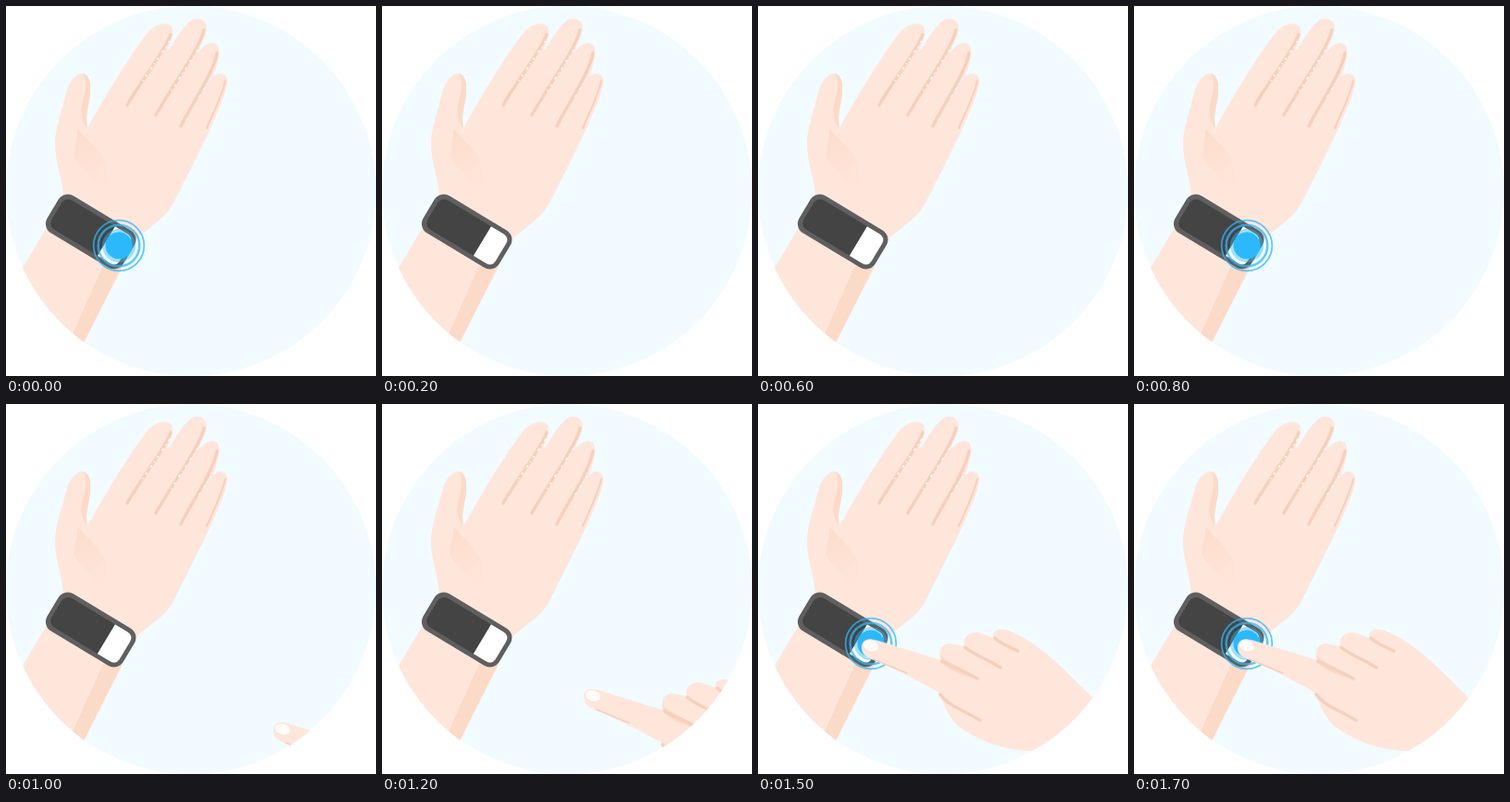
An HTML page for the animation above (1800 ms loop, 400 by 400 pixels).

```html
<!DOCTYPE html>
<html lang="en">
<head>
<meta charset="utf-8">
<title>Tap the wristband</title>
<style>
  html, body { margin: 0; width: 100%; height: 100%; overflow: hidden; background: #fff; }
  svg { display: block; width: 100%; height: 100%; }
  .skin { fill: #ffe6db; }
  .shade { fill: #fbdac8; }
  .crease { fill: none; stroke: #f5d0bc; stroke-width: 3.5; stroke-linecap: round; }
  .glint { fill: none; stroke: #fff; stroke-width: 1.5; stroke-dasharray: 2 5 1 4 3 7; }
  .ring { fill: none; stroke: #2bb9fc; stroke-opacity: .75; }
</style>
</head>
<body>
<svg viewBox="0 0 400 400">
  <defs>
    <clipPath id="disc"><circle cx="200" cy="200" r="200"/></clipPath>
    <linearGradient id="palm" x1="0" y1="0" x2=".3" y2="1">
      <stop offset="0" stop-color="#fbdac8" stop-opacity=".8"/>
      <stop offset="1" stop-color="#fbdac8" stop-opacity=".1"/>
    </linearGradient>
  </defs>
  <g clip-path="url(#disc)">
    <rect width="400" height="400" fill="#f2fbff"/>

    <!-- forearm -->
    <path class="skin" d="M46 236L10 296L60 380H76L126 282Z"/>
    <path class="shade" d="M105 281L70 359L84 364L125 282Z"/>

    <!-- open hand -->
    <path class="skin" d="M62 206C61 185 53 170 53 148C53 132 60 115 65 94C69 80 76 73 83 73
      C90 74 92 83 91 95C90 108 85 116 88 132C103 105 133 54 153 29C162 18 176 16 180 24
      C181 33 177 41 174 48L177 46C185 33 193 20 201 15C209 11 217 16 217 24C216 34 209 44 207 51
      C213 43 220 38 227 41C234 46 229 61 224 77C230 70 239 73 239.5 81C238 94 230 112 222 130
      C210 156 194 187 180 215C172 230 155 238 141 252L90 240Z"/>
    <path class="shade" d="M83 73C90 74 92 83 91 95C90 108 85 116 88 132C82 125 80 116 82 106C86 94 88 82 83 73Z"/>
    <path fill="url(#palm)" d="M78 133C88 146 107 158 109 178C110 190 108 198 106 204C98 187 82 178 73 163Z"/>
    <g class="crease">
      <path d="M178 31C172 48 148 78 131 107"/>
      <path d="M214 26C210 45 180 86 162 118"/>
      <path d="M228 51C224 73 202 104 189 130"/>
      <path d="M237 81C235 93 226 112 217 132" stroke-width="2"/>
    </g>
    <path class="glint" d="M177 38L147 82M207 48L177 94M222 78L209 98"/>

    <!-- wristband -->
    <g transform="translate(91.7 244) rotate(31)">
      <rect x="-48" y="-23.5" width="96" height="47" rx="12" fill="#5f5f5f"/>
      <rect x="-43" y="-18.5" width="86" height="37" rx="8" fill="#444"/>
      <path d="M19.5 -18.5H35Q43 -18.5 43 -10.5V10.5Q43 18.5 35 18.5H19.5Z" fill="#fff"/>
    </g>

    <g id="pulse" transform="translate(122 259)">
      <circle class="ring" r="27.3" stroke-width="1.8"/>
      <circle class="ring" r="22.3" stroke-width="2.5"/>
      <circle r="18" fill="#2bb9fc" fill-opacity=".45"/>
      <circle r="14.5" fill="#2bb9fc"/>
    </g>

    <!-- pointing hand, drawn where it touches the screen -->
    <g id="pointer">
      <path class="skin" d="M111 264C111 257 118 254 126 256C148 263 172 270 197 278
        C193 266 199 260 207 260L222 263C220 252 228 247 237 248L254 254C252 246 259 243 267 245
        C302 257 330 288 360 318L420 370V420H340L300 376C270 377 242 367 221 353
        C205 342 201 328 195 313C172 300 146 287 120 276C113 273 111 269 111 264Z"/>
      <path class="shade" d="M196 271C201 281 217 283 238 299C223 296 205 289 197 280Z"/>
      <g class="crease" stroke-width="2">
        <path d="M198 279C210 286 226 291 236 298"/>
        <path d="M223 264C233 273 248 277 261 286"/>
        <path d="M255 254C262 261 272 264 280 268"/>
        <path d="M196 315C205 328 226 334 239 343"/>
        <path d="M124 277L160 292" stroke-width="1.5"/>
      </g>
      <ellipse cx="121" cy="262.5" rx="9" ry="6.5" transform="rotate(14 121 262.5)"
        fill="#fffbf9" stroke="#fcdfd3"/>
    </g>
  </g>
</svg>
<script>
  const pulse = document.getElementById('pulse');
  const pointer = document.getElementById('pointer');
  const LOOP = 1800, STEP = 100, ENTER = 10, TOUCH = 15;
  const show = (el, on) => el.setAttribute('visibility', on ? 'visible' : 'hidden');
  const start = performance.now();

  function draw(now) {
    const step = Math.floor(Math.max(0, now - start) % LOOP / STEP);
    const left = Math.max(0, TOUCH - step);
    // Slow blink while idle, quick blink once touched
    const lit = step < ENTER ? Math.floor(step / 2) % 2 === 0
                             : step >= TOUCH && (step - TOUCH) % 2 === 0;
    show(pulse, lit);
    show(pointer, step >= ENTER);
    pointer.setAttribute('transform', `translate(${1 + left * 35.4} ${left * 18 - 1})`);
    requestAnimationFrame(draw);
  }
  draw(start);
</script>
</body>
</html>
```
